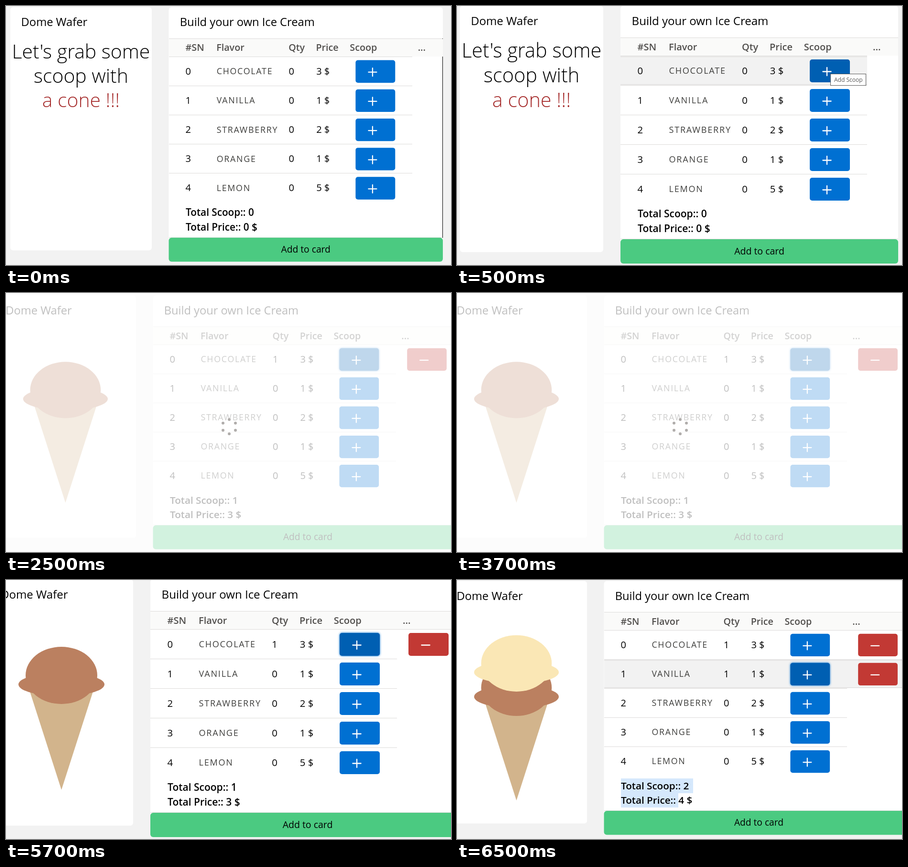
Animation of 931 by 543 pixels, one loop 8000 ms. Source, as an HTML page:

```html
<!DOCTYPE html>
<html lang="en">
<head>
<meta charset="utf-8">
<title>Ice cream builder</title>
<style>
  html, body { margin: 0; width: 100%; height: 100%; overflow: hidden; background: #f2f2f2; }
  svg { display: block; width: 931px; height: 543px; font-family: 'Open Sans', 'Noto Sans', sans-serif; }
  .title { font-size: 24px; }
  .hello { font-size: 41.4px; font-weight: 300; text-anchor: middle; }
  .head { font-size: 20px; font-weight: 600; fill: #514f4d; }
  .cell { font-size: 20.3px; }
  .flavor { font-size: 18px; letter-spacing: 1.8px; fill: #3e3e3c; }
  .total { font-size: 21px; font-weight: 600; }
  .add { font-size: 19.5px; text-anchor: middle; }
  .tip { font-size: 12px; fill: #575757; }
  .focus { filter: drop-shadow(0 0 2px #0070d2); }
</style>
</head>
<body>
<svg id="stage" viewBox="0 0 931 543"></svg>
<script>
const RULE = '#dddbda', BLUE = '#0070d2', BLUE_DARK = '#005fb2', RED = '#c23934';
const ROW_TOP = 104, ROW_H = 62, NARROW = 516, MID = -186;
const FLAVORS = [
  ['CHOCOLATE', 3, '#bb8060'],
  ['VANILLA', 1, '#fae7b5'],
  ['STRAWBERRY', 2, '#f4a6b4'],
  ['ORANGE', 1, '#ffb04d'],
  ['LEMON', 5, '#fff26b']
];

// x, y and zoom place the order card; scoops lists flavor indexes from the cone up
const SCENES = [
  { at: 0, x: 340.5, y: 3, zoom: .987, scoops: [], edge: true },
  { at: 500, x: 342, y: 0, zoom: 1, scoops: [], hover: 0, active: 0, tip: true },
  { at: 2500, x: 307.5, y: 5.5, zoom: .9846, scoops: [0], active: 0, focus: true, busy: true },
  { at: 4500, x: 302, y: -1, zoom: 1, scoops: [0], active: 0, focus: true },
  { at: 6500, x: 307.5, y: 2.5, zoom: .9846, scoops: [0, 1], hover: 1, active: 1, focus: true, picked: true }
];
const LOOP = 8000;
const stage = document.getElementById('stage');

function add(parent, tag, attrs, text) {
  const el = document.createElementNS('http://www.w3.org/2000/svg', tag);
  for (const key in attrs) el.setAttribute(key, attrs[key]);
  if (text !== undefined) el.textContent = text;
  parent.appendChild(el);
  return el;
}
const box = (g, x, y, width, height, fill, rx = 0) =>
  add(g, 'rect', { x, y, width, height, fill, rx, 'shape-rendering': rx ? 'auto' : 'crispEdges' });
const rule = (g, y, width) => box(g, 0, y, width, 1, RULE);
const label = (g, cls, x, y, text, fill) =>
  add(g, 'text', fill ? { class: cls, x, y, fill } : { class: cls, x, y }, text);

function button(g, x, y, fill, sign, focus) {
  const b = box(g, x, y, 84, 48, fill, 5);
  if (focus) b.setAttribute('class', 'focus');
  const cx = x + 36, cy = y + 25.5, r = 8.6;
  const d = `M${cx - r} ${cy}h${2 * r}` + (sign === '+' ? `M${cx} ${cy - r}v${2 * r}` : '');
  add(g, 'path', { d, stroke: '#fff', 'stroke-width': 2.3, 'stroke-linecap': 'round' });
}

function iceCream(g, scoops) {
  const drop = (scoops.length - 1) * 26;
  const tip = 441 + drop;
  add(g, 'path', { d: `M${MID} ${tip}l-75 -234h150z`, fill: '#d2b48c' });
  scoops.forEach((id, i) => {
    const cy = 201 + drop - i * 52, fill = FLAVORS[id][2];
    add(g, 'ellipse', { cx: MID, cy, rx: 75, ry: 60, fill });
    add(g, 'ellipse', { cx: MID, cy: cy + 19, rx: 90, ry: 24.5, fill });
  });
}

function sidePanel(g, scoops) {
  box(g, -336, -.5, 300, 516.5, '#fff', 6);
  label(g, 'title', -313, 40, 'Dome Wafer');
  if (scoops.length) return iceCream(g, scoops);
  label(g, 'hello', MID, 108, "Let's grab some");
  label(g, 'hello', MID, 160, 'scoop with');
  label(g, 'hello', MID, 212, 'a cone !!!', 'brown');
}

function row(g, i, scene, width) {
  const [name, price] = FLAVORS[i];
  const y = ROW_TOP + i * ROW_H;
  const qty = scene.scoops.filter(id => id === i).length;
  const rowWidth = qty ? width : NARROW;
  if (scene.hover === i) {
    box(g, 0, y, rowWidth, ROW_H, '#f2f2f2');
    rule(g, y + 2, rowWidth);
    rule(g, y + ROW_H - 2, rowWidth);
  }
  rule(g, y, rowWidth);
  label(g, 'cell', 35.5, y + 38.5, i);
  label(g, 'flavor', 101.5, y + 38, name);
  label(g, 'cell', 254.3, y + 38.5, qty);
  label(g, 'cell', 312.8, y + 38.5, price + ' $');
  const active = scene.active === i;
  button(g, 396, y + 8, active ? BLUE_DARK : BLUE, '+', active && scene.focus);
  if (qty) button(g, 540, y + 8, RED, '-');
}

function orderPanel(g, scene) {
  const { scoops } = scene;
  const width = scoops.length ? 658 : 581;
  box(g, 0, -.5, width, 520, '#fff', 6);
  label(g, 'title', 23.6, 40, 'Build your own Ice Cream');
  box(g, 0, 66, width, 38, '#fafaf9');
  rule(g, 66, width);
  [['#SN', 35.5], ['Flavor', 101], ['Qty', 254], ['Price', 312], ['Scoop', 383.8], ['...', 528]]
    .forEach(([text, x]) => label(g, 'head', x, 92.5, text));
  FLAVORS.forEach((_, i) => row(g, i, scene, width));

  if (scene.picked) {
    box(g, 36, 420, 153, 31, '#d5e8fc');
    box(g, 36, 451, 122, 31, '#d5e8fc');
  }
  const cost = scoops.reduce((sum, id) => sum + FLAVORS[id][1], 0);
  label(g, 'total', 36, 443, 'Total Scoop:: ' + scoops.length);
  label(g, 'total', 36, 474, `Total Price:: ${cost} $`);
  rule(g, 488, width);
  box(g, 0, 489, width, 51, '#4bca81', 6);
  label(g, 'add', width / 2, 521, 'Add to card');
}

function spinner(g) {
  box(g, 0, 0, 931, 543, 'rgba(255,255,255,.75)');
  for (let k = 0; k < 6; k++) {
    const a = k * Math.PI / 3;
    add(g, 'circle', { cx: 467 + 15 * Math.sin(a), cy: 280.3 - 15 * Math.cos(a), r: 3, fill: '#b0adab' });
  }
}

function build(scene) {
  const view = add(stage, 'g', { display: 'none' });
  const page = add(view, 'g', { transform: `translate(${scene.x} ${scene.y}) scale(${scene.zoom})` });
  sidePanel(page, scene.scoops);
  orderPanel(page, scene);
  if (scene.edge) {
    box(view, 913, 68, 1, 1, '#000');
    box(view, 913, 106, 1, 380, '#000');
  }
  if (scene.tip) {
    add(view, 'rect', { x: 781.5, y: 142.5, width: 74, height: 24, fill: '#fff', stroke: '#575757' });
    label(view, 'tip', 789, 159, 'Add Scoop');
  }
  if (scene.busy) spinner(view);
  return view;
}

const views = SCENES.map(build);
let shown = -1;
function draw(now) {
  const t = now % LOOP;
  const next = SCENES.filter(s => s.at <= t).length - 1;
  if (next !== shown) {
    views.forEach((v, i) => v.setAttribute('display', i === next ? 'inline' : 'none'));
    shown = next;
  }
}
const start = performance.now();
function tick() {
  draw(performance.now() - start);
  requestAnimationFrame(tick);
}
tick();
</script>
</body>
</html>
```
